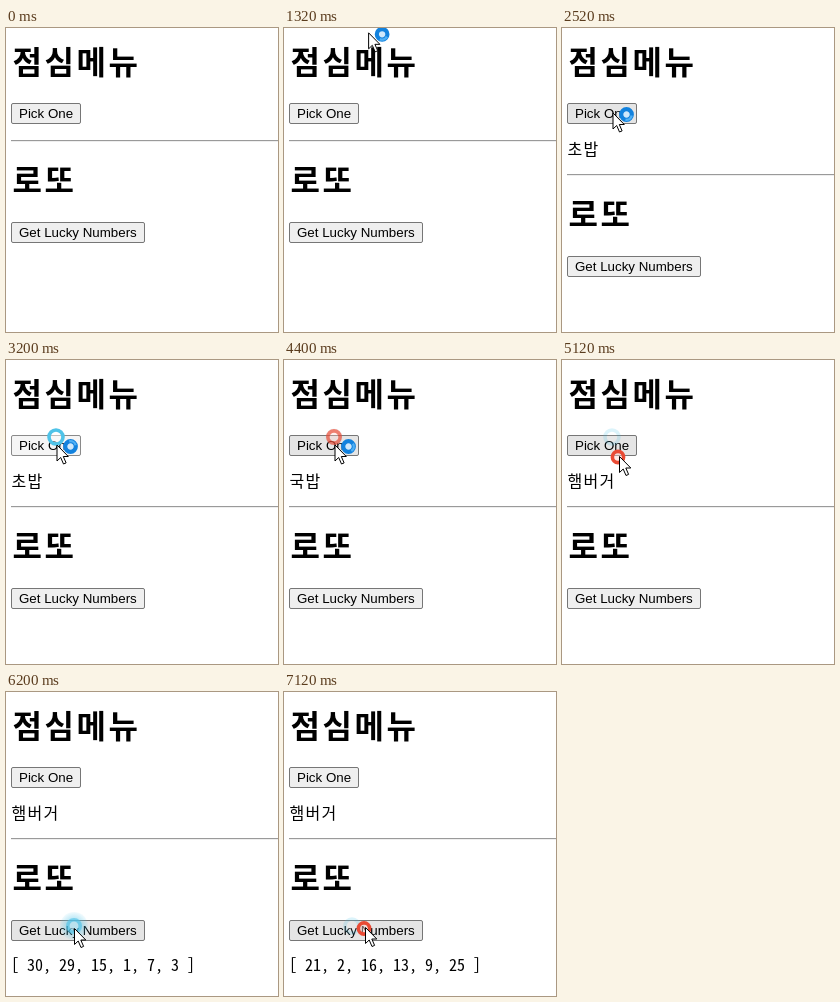
These frames come from a looping animation (272x304 px, 7200 ms). An HTML page:

```html
<!DOCTYPE html>
<html lang="ko">
<head>
<meta charset="utf-8">
<title>점심메뉴</title>
<style>
  html, body { margin: 0; width: 100%; height: 100%; overflow: hidden; background: #fff; }
  svg { display: block; width: 100vw; height: 100vh; }
  text { fill: #000; white-space: pre; }
  .title { font: bold 32px "Noto Sans CJK KR", "Noto Sans KR", "Noto Sans CJK", sans-serif; letter-spacing: .08em; }
  .menu { font: 16px "Noto Sans CJK KR", "Noto Sans KR", "Noto Sans CJK", sans-serif; letter-spacing: .08em; }
  .label { font: 13.333px "Liberation Sans", Arial, sans-serif; }
  .numbers { font: 16px "Noto Sans Mono CJK KR", "Noto Sans Mono", monospace; letter-spacing: calc(8px - 1ch); }
  .button { fill: #efefef; stroke: #767676; }
  .button.hover { fill: #e5e5e5; }
  .button.active { fill: #f5f5f5; stroke: #8a8a8a; }
  .ring { fill-opacity: .45; stroke-width: 3.6; }
</style>
</head>
<body>
<svg viewBox="0 0 272 304">
  <defs>
    <radialGradient id="glow">
      <stop offset=".4" stop-color="#4fc3e8" stop-opacity=".6"/>
      <stop offset="1" stop-color="#4fc3e8" stop-opacity=".1"/>
    </radialGradient>
  </defs>
  <text class="title" x="6.6" y="46">점심메뉴</text>
  <rect class="button" id="pick" x="5.5" y="75.5" width="69" height="20" rx="1.5"/>
  <text class="label" x="13" y="90">Pick One</text>
  <text class="menu" id="menu" x="5.5" y="126.5"></text>
  <g id="lower">
    <path d="M5 112.5H272" stroke="#9a9a9a"/>
    <path d="M5 113.5H272" stroke="#eee"/>
    <text class="title" x="6.6" y="164">로또</text>
    <rect class="button" id="lucky" x="5.5" y="194.5" width="133" height="20" rx="1.5"/>
    <text class="label" x="13" y="209">Get Lucky Numbers</text>
  </g>
  <text class="numbers" id="numbers" x="5" y="279"></text>
  <circle id="halo" fill="url(#glow)"/>
  <circle class="ring" id="press" fill="#fff" stroke="#4fc3e8"/>
  <circle class="ring" id="release" fill="#ffd0ca" stroke="#ea4b35"/>
  <g id="cursor">
    <g id="busy" transform="translate(14 2)">
      <circle r="5.3" fill="#cfe8fb" stroke="#1282de" stroke-width="4.2"/>
      <path id="glint" d="M0-5.3A5.3 5.3 0 0 1 5.3 0" fill="none" stroke="#4fb0f5" stroke-width="2.4"/>
    </g>
    <path d="M.5.5V16.5L4.2 13L7 19.5L9.6 18.4L6.8 12H11.8Z" fill="#fff" stroke="#000"/>
  </g>
</svg>
<script>
const LOOP = 7200;
const $ = id => document.getElementById(id);

// time, x, y of the pointer tip
const path = [
  [1080, 96, -24], [1800, 50.5, 84.5], [5000, 50.5, 84.5], [5080, 57, 96],
  [5400, 57, 96], [5640, 68, 236], [6960, 68, 236], [7080, 81, 235]
];
const onPick = { x: 50, y: 77 };
const onLucky = { x: 68, y: 234 };
const clicks = [
  { down: 1840, up: 1960, at: onPick },
  { down: 3080, up: 3240, at: onPick },
  { down: 4120, up: 4300, at: onPick },
  { down: 4840, up: 5080, at: onPick, end: { x: 56, y: 97 } },
  { down: 5680, up: 5800, at: onLucky },
  { down: 6180, up: 6320, at: onLucky },
  { down: 6800, up: 7080, at: onLucky, end: { x: 80, y: 236.5 } }
];
const menus = [[0, ''], [2240, '초밥'], [4320, '국밥'], [5080, '햄버거']];
const draws = [
  [0, ''],
  [5800, '[ 30, 29, 15, 1, 7, 3 ]'],
  [6360, '[ 24, 7, 10, 13, 2, 26 ]'],
  [7100, '[ 21, 2, 16, 13, 9, 25 ]']
];
const pauses = [[2000, 2240], [4400, 4640]];

const clamp = v => Math.min(1, Math.max(0, v));
const mix = (a, b, k) => a + (b - a) * k;
const latest = (list, t) => list.filter(item => item[0] <= t).pop()[1];

// Time without the pauses, in which the rings stand still
const running = t => pauses.reduce((sum, [a, b]) => sum - Math.min(b - a, Math.max(0, t - a)), t);

function pointer(t) {
  const i = path.findIndex(p => p[0] > t);
  if (i === 0) return path[0].slice(1);
  if (i < 0) return path[path.length - 1].slice(1);
  const [a, b] = [path[i - 1], path[i]];
  const k = clamp((t - a[0]) / (b[0] - a[0]));
  const ease = k * k * (3 - 2 * k);
  return [mix(a[1], b[1], ease), mix(a[2], b[2], ease)];
}

function ring(id, point, r, opacity) {
  const el = $(id);
  el.setAttribute('cx', point.x);
  el.setAttribute('cy', point.y);
  el.setAttribute('r', r);
  el.setAttribute('opacity', opacity);
}

function drawRings(t) {
  const click = clicks.filter(c => c.down <= t).pop();
  for (const id of ['halo', 'press', 'release']) $(id).setAttribute('opacity', 0);
  if (!click) return;
  const settle = clamp((t - click.down) / 90);
  const age = running(t) - running(click.up);
  const fade = age < 0 ? 1 : .3 * (1 - clamp(age / 120));
  ring('halo', click.at, 14, 1 - settle);
  ring('press', click.at, mix(6, 7, settle), mix(.5, 1, settle) * fade);
  if (age >= 0) {
    const k = clamp((age - 40) / 200);
    ring('release', click.end || click.at, mix(5.6, 7.5, k), 1 - k);
  }
}

function drawButton(el, hover, active) {
  el.setAttribute('class', 'button' + (hover ? ' hover' : '') + (hover && active ? ' active' : ''));
}

function setText(el, value) {
  if (el.textContent !== value) el.textContent = value;
}

function draw(t) {
  setText($('menu'), latest(menus, t));
  setText($('numbers'), latest(draws, t));
  $('lower').setAttribute('transform', `translate(0 ${t < 2240 ? 0 : 34})`);
  const active = clicks.some(c => t >= c.down + 40 && t < c.up);
  drawButton($('pick'), t >= 1800 && t < 5440, active);
  drawButton($('lucky'), t >= 5600, active);
  drawRings(t);
  $('cursor').setAttribute('transform', `translate(${pointer(t)})`);
  $('busy').setAttribute('visibility', t < 5000 ? 'visible' : 'hidden');
  $('glint').setAttribute('transform', `rotate(${running(t) * .36})`);
}

const start = performance.now();
function tick() {
  draw((performance.now() - start) % LOOP);
  requestAnimationFrame(tick);
}
tick();
</script>
</body>
</html>
```
